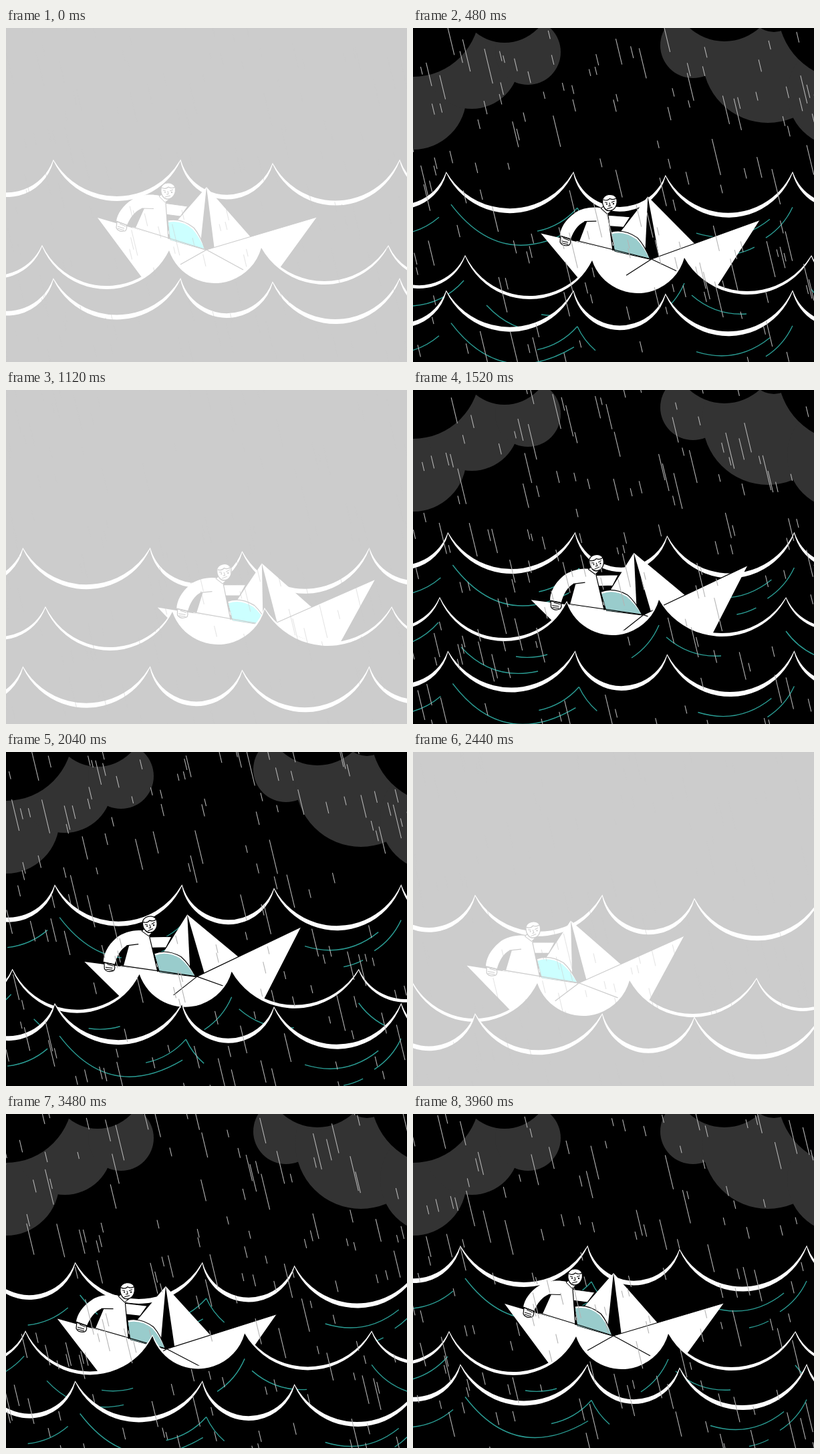
Write an HTML page with a canvas that moves like this. It is 600x500 px and loops after 4 s.

```html
<!DOCTYPE html>
<html lang="en">
<head>
<meta charset="utf-8">
<title>Paper boat in a storm</title>
<style>
  html, body { margin: 0; width: 100%; height: 100%; overflow: hidden; background: #000; }
  canvas { display: block; width: 600px; height: 500px; }
</style>
</head>
<body>
<canvas id="stage" width="600" height="500"></canvas>
<script>
const ctx = document.getElementById('stage').getContext('2d');
const LOOP = 4000, STEP = 40, SPAN = LOOP - STEP;
const FLASHES = [0, 1120, 2440];
const WHITE = '#fff', TEAL = '#2a9d94';
let ink, lightning;

// Far and near waves swing from side to side: time, side
const SWING = [[0, 0], [1030, -1], [1890, 0], [3130, 1], [SPAN, 0]];

// Middle wave x, y and boat x, y, tilt at a few times of the loop
const POSES = [
  [0, 0, 0, 0, 0, 0],
  [480, 24, 15, 54, 14, -3.3],
  [1120, 5, -1, 88.5, 21, -7.2],
  [1520, -14, -15, 37.5, 5, -8.9],
  [2440, -58, 13, -58, 14, -7.6],
  [3040, -44, 5, -92, 36.5, -3.8]
];

// Lifts, sags repeat every four crests; ripples are x, y, width, height
const FAR_SEA = {
  x: 71, y: 199, thick: 6, drops: [0, 0, 5, 0], sags: [60, 55, 64, 54],
  ripples: [[78, 246, 184, 36], [0, 291, 60, -26], [207, 286, 60, -35], [267, 251, 27, 36],
    [445, 289, 110, -21], [503, 320, 29, -10], [549, 296, 40, -46]]
};
const MID_SEA = {
  x: 54, y: 327, thick: 4, drops: [0, 6, 2, 0], sags: [61, 51, 56, 48],
  ripples: [[-24, 401, 76, -38], [86, 400, 115, 36], [168, 414, 47, -3],
    [341, 416, 41, -49], [393, 385, 82, 28], [572, 376, 57, 41]]
};

const smooth = u => u * u * (3 - 2 * u);

function swing(t) {
  const i = SWING.findIndex(([end]) => end >= t && end > 0);
  const [[t0, a], [t1, b]] = [SWING[i - 1], SWING[i]];
  return a + (b - a) * smooth((t - t0) / (t1 - t0));
}

// Smooth periodic curve through the poses
function poseAt(t) {
  const n = POSES.length;
  const pose = j => {
    const turn = Math.floor(j / n), [time, ...rest] = POSES[j - turn * n];
    return [time + turn * SPAN, ...rest];
  };
  const slope = (j, c) => {
    const [p, q, r] = [pose(j - 1), pose(j), pose(j + 1)];
    const h0 = q[0] - p[0], h1 = r[0] - q[0];
    return ((q[c] - p[c]) / h0 * h1 + (r[c] - q[c]) / h1 * h0) / (h0 + h1);
  };
  let i = n - 1;
  while (POSES[i][0] > t) i--;
  const a = pose(i), b = pose(i + 1), h = b[0] - a[0], u = (t - a[0]) / h;
  return a.map((v, c) => v + (b[c] - v) * smooth(u)
    + h * u * (1 - u) * ((1 - u) * slope(i, c) - u * slope(i + 1, c))).slice(1);
}

function disc(x, y, r, color) {
  ctx.fillStyle = color;
  ctx.beginPath();
  ctx.arc(x, y, r, 0, 7);
  ctx.fill();
}

function shape(d, fill, stroke, width = 1.2) {
  const path = new Path2D(d);
  if (fill) { ctx.fillStyle = fill; ctx.fill(path); }
  if (stroke) { ctx.strokeStyle = stroke; ctx.lineWidth = width; ctx.stroke(path); }
}

// Circular arc hanging between two crests
function trough([x0, y0], [x1, y1], sag) {
  const c = Math.hypot(x1 - x0, y1 - y0), r = (c * c / 4 + sag * sag) / (2 * sag);
  const cx = (x0 + x1) / 2 - (y1 - y0) / c * (sag - r);
  const cy = (y0 + y1) / 2 + (x1 - x0) / c * (sag - r);
  ctx.arc(cx, cy, r, Math.atan2(y0 - cy, x0 - cx), Math.atan2(y1 - cy, x1 - cx), true);
}

function ripple([x, y, w, h]) {
  const bulge = Math.hypot(w, h) / 420;
  ctx.moveTo(x, y);
  ctx.quadraticCurveTo(x + w / 2 - h * bulge, y + h / 2 + w * bulge, x + w, y + h);
}

function sea({ x, y, thick, drops, sags, ripples }, dx, dy) {
  // wide and narrow troughs alternate
  const crest = k => [x + 328 * Math.floor(k / 2) + (k & 1) * 190, y + drops[k & 3]];
  const body = (cut, color) => {
    ctx.beginPath();
    for (let k = -1; k < 4; k++) trough(crest(k), crest(k + 1), sags[k & 3] - cut);
    ctx.lineTo(740, 560);
    ctx.lineTo(-90, 560);
    ctx.closePath();
    ctx.fillStyle = color;
    ctx.fill();
  };
  ctx.save();
  ctx.translate(dx, dy);
  body(thick, WHITE);
  ctx.strokeStyle = WHITE;
  ctx.lineWidth = 2;
  ctx.stroke();
  body(0, ink);
  if (!lightning) {
    ctx.strokeStyle = TEAL;
    ctx.lineWidth = 1.4;
    ctx.beginPath();
    ripples.forEach(ripple);
    ctx.stroke();
  }
  ctx.restore();
}

function clouds() {
  for (const c of [[0, 102, 80], [88, 50, 71], [172, 36, 49], [419, 26, 49], [531, 44, 98], [640, 98, 80]])
    disc(...c, '#333');
  for (const c of [[0, -27, 100], [137, -47, 69], [466, -58, 78], [540, -30, 36], [650, -27, 104]])
    disc(...c, ink);
}

function sailor() {
  // far arm, legs, torso, near arm
  shape('M236 262 L272 267 L261 282 L238 279Z', WHITE, ink);
  shape('M242 288 Q262 284 281 299 Q291 311 298 332 L246 317Z', WHITE, ink);
  shape('M243 291 Q262 287 279 301 Q289 312 297 331 L246 317Z', lightning ? '#cff' : '#99cccc');
  shape('M205 258 L238 251 L243 316 L189 299 L202 271Z', WHITE);
  shape('M202 270 L207 270 L194 299 L187 297Z', ink);
  shape('M240 256 C228 247 203 248 190 256 C174 266 167 278 165 289 L181 295 Q189 276 203 270 L238 266Z', WHITE);
  shape('M203 270 L221 270.5 M239 262 L243 316 M165 289 L181 295', null, ink);
  // hand
  shape('M166 290 L180 295 Q182 301 178 304 Q168 306 165 299Z', WHITE, ink);
  shape('M167 297 L177 300 M167 300 L177 303 M170 293 L179 297', null, ink, 1);
  // head
  shape('M233 249 Q236 258 245 256 L238 261 L229 252Z', WHITE, ink, 1);
  shape('M232 241 C232 230 250 229 253 238 C255 247 250 256 242 256 C235 256 231 248 232 241Z', WHITE, ink);
  shape('M233 239 Q239 242 243 238 Q248 241 253 238', null, ink);
  shape('M235 243 L239 244 M245 244 L250 242 M242 244 L243 249 L240 249 M238 253 L246 251', null, ink, 1);
  disc(238, 246, 1, ink);
  disc(248, 246, 1.2, ink);
}

function boat(dx, dy, deg) {
  ctx.save();
  ctx.translate(301 + dx, 283.5 + dy);
  ctx.rotate(deg * Math.PI / 180);
  ctx.translate(-301, -283.5);
  ctx.lineJoin = 'round';
  shape('M300 238 L240 307 L300 334 L366 313Z', WHITE);
  shape('M300 238 L290 332 L312 332Z', ink);
  shape('M137 284 L300 332 L465 283 L380 400 L223 400Z', WHITE);
  sailor();
  shape('M187 297 L300 332 L465 283 M261 354 L300 332 L355 362', null, ink);
  ctx.restore();
}

const random = n => {
  const v = Math.sin(n * 127.1 + 11.7) * 43758.5453;
  return v - Math.floor(v);
};

function rain(t) {
  ctx.strokeStyle = lightning ? 'rgba(204,204,204,.5)' : '#b4b4b4';
  ctx.lineWidth = 1.1;
  ctx.beginPath();
  for (let i = 0; i < 215; i++) {
    const long = i % 3 === 0;
    const len = long ? 30 + 24 * random(i) : 10 + 10 * random(i);
    const y = (random(i + 600) + (long ? 6 : 5) * t / LOOP) % 1 * 580 - 60;
    const x = i * .618034 % 1 * 740 - 130 + y * .24;
    ctx.moveTo(x, y);
    ctx.lineTo(x + len * .24, y + len);
  }
  ctx.stroke();
}

function draw(now) {
  const t = Math.floor(now % LOOP / STEP) * STEP;
  lightning = FLASHES.includes(t);
  ink = lightning ? '#ccc' : '#000';
  ctx.fillStyle = ink;
  ctx.fillRect(0, 0, 600, 500);
  if (!lightning) clouds();

  const side = swing(t), reach = Math.abs(side);
  const farX = 50 * side + 3 * reach, farY = 40.5 * reach;
  const [midX, midY, ...boatPose] = poseAt(t % SPAN);
  sea(FAR_SEA, farX, farY);
  boat(...boatPose);
  sea(MID_SEA, midX, midY);
  sea(FAR_SEA, farX, farY + 177.5);
  rain(t);
}

const start = performance.now();
function tick() {
  draw(performance.now() - start);
  requestAnimationFrame(tick);
}
tick();
</script>
</body>
</html>
```
